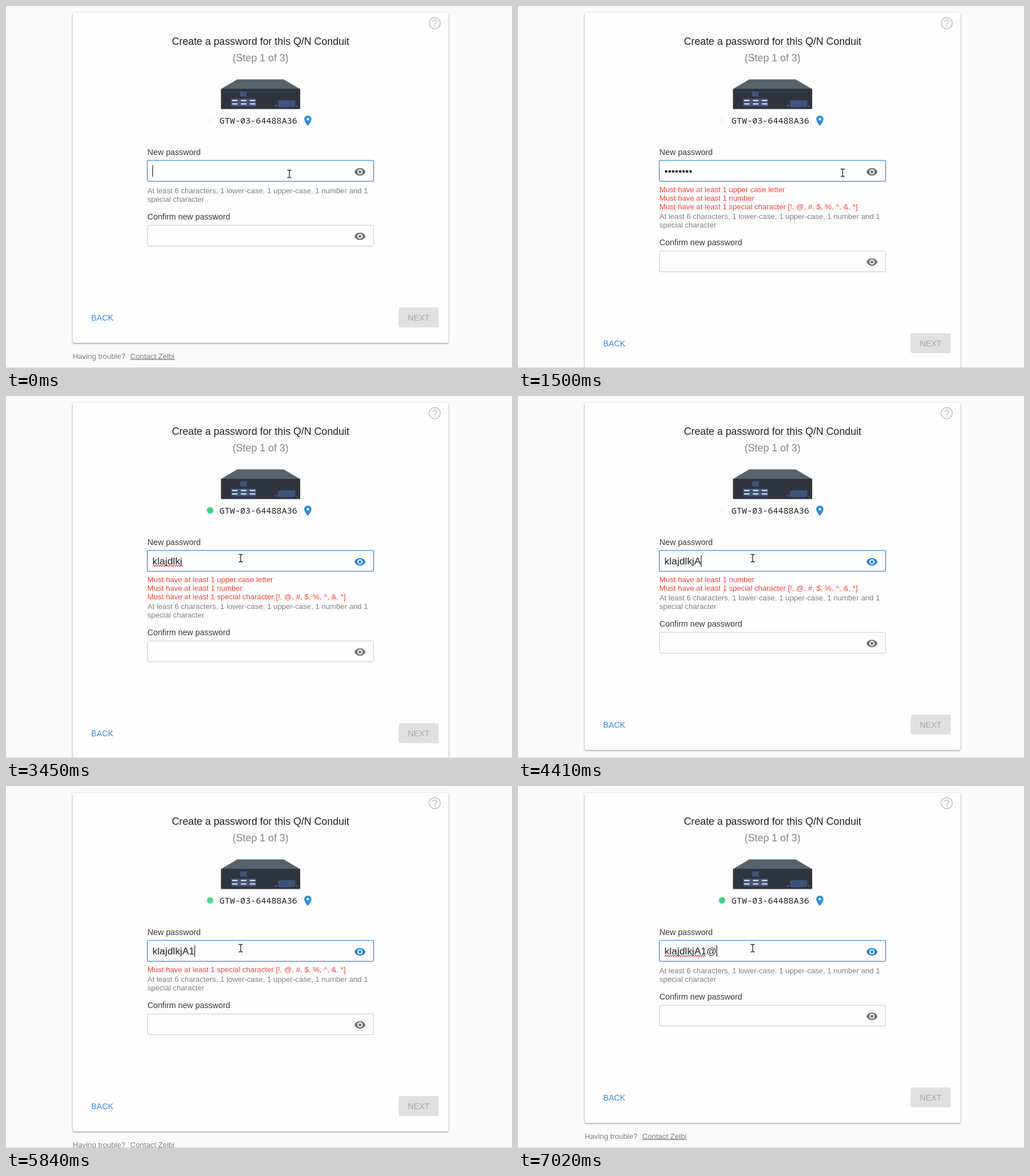
An HTML page that plays this animation: 884x634 px, repeating every 7.1 s.

```html
<!DOCTYPE html>
<html lang="en">
<head>
<meta charset="utf-8">
<title>Create a password</title>
<style>
  html, body { margin: 0; width: 100%; height: 100%; overflow: hidden; background: #fafafa; }
  svg { display: block; font: 14.22px "Liberation Sans", Arial, sans-serif; fill: #3a3a3a; }
  .mid { text-anchor: middle; }
  .big { font-size: 17.78px; }
  .small { font-size: 13.16px; fill: #808080; }
  .error { font-size: 13.16px; fill: #f44336; }
  .box { fill: #fefefe; stroke: #c8c8c8; }
  .focus { stroke: #5b9ce6; stroke-width: 1.6; }
  #card { fill: #fefefe; filter: drop-shadow(0 1px 1px #0004) drop-shadow(0 1px 1.5px #0003); }
  #secret { font-size: 17.4px; fill: #222; }
</style>
</head>
<body>
<svg width="884" height="634" viewBox="0 0 884 634">
  <defs>
    <path id="eye" transform="translate(-10.67 -10.67) scale(.889)" d="M12 4.5C7 4.5 2.73 7.61 1 12c1.73 4.39 6 7.5 11 7.5s9.27-3.11 11-7.5c-1.73-4.39-6-7.5-11-7.5zM12 17c-2.76 0-5-2.24-5-5s2.24-5 5-5 5 2.24 5 5-2.24 5-5 5zm0-8c-1.66 0-3 1.34-3 3s1.34 3 3 3 3-1.34 3-3-1.34-3-3-3z"/>
  </defs>

  <rect id="card" x="116.5" y="11.5" width="656.5" rx="4"/>
  <path fill="#cdcdcd" transform="translate(736.1 17) scale(1.075)" d="M11 18h2v-2h-2v2zm1-16C6.48 2 2 6.48 2 12s4.48 10 10 10 10-4.48 10-10S17.52 2 12 2zm0 18c-4.41 0-8-3.59-8-8s3.59-8 8-8 8 3.59 8 8-3.59 8-8 8zm0-14c-2.21 0-4 1.79-4 4h2c0-1.1.9-2 2-2s2 .9 2 2c0 2-3 1.75-3 5h2c0-2.25 3-2.5 3-5 0-2.21-1.79-4-4-4z"/>
  <text class="mid big" x="444.7" y="68" fill="#222">Create a password for this Q/N Conduit</text>
  <text class="mid big" x="444.7" y="97" fill="#858585">(Step 1 of 3)</text>

  <path fill="#59626a" d="M404 128.5h81l29 17H375.500z"/>
  <rect x="375.500" y="145" width="138.500" height="35.500" rx="1.500" fill="#2f343d"/>
  <g fill="#41527a">
    <rect x="409" y="149.500" width="11.500" height="9"/>
    <rect x="393" y="162" width="44" height="14"/>
    <rect x="475" y="165" width="30.500" height="12" rx="2.500"/>
    <circle cx="471.500" cy="175" r="2"/>
    <circle cx="508.500" cy="175.500" r="1.500"/>
  </g>
  <path stroke="#f2f4f8" stroke-width="2" d="M395 165.500h9.500m6 0h9.500m6 0h9.500M395 171.500h9.500m6 0h9.500m6 0h9.500"/>

  <circle id="dot" cx="356.500" cy="200.200" r="5.700" fill="#38d27f"/>
  <text x="373" y="206" fill="#222" style="font: 15.1px 'Noto Sans Mono', monospace">GTW-03-64488A36</text>
  <path fill="#2f8be0" transform="translate(516.500 190.100) scale(.9)" d="M12 2C8.130 2 5 5.130 5 9c0 5.250 7 13 7 13s7-7.750 7-13c0-3.870-3.130-7-7-7zm0 9.500c-1.380 0-2.500-1.120-2.500-2.500s1.120-2.500 2.500-2.500 2.500 1.120 2.500 2.500-1.120 2.500-2.500 2.500z"/>

  <text x="247" y="261">New password</text>
  <rect id="field" class="box" x="247" y="270.500" width="395.300" height="36.500" rx="1.500"/>
  <text id="secret" x="255.800" y="295"></text>
  <path id="squiggle" fill="none" stroke="#e53935" stroke-width="1.100"/>
  <rect id="caret" y="279" width="1.200" height="20" fill="#222"/>
  <circle id="ripple" cx="618" cy="290" fill="#000"/>
  <use id="reveal" href="#eye" x="618.400" y="290.400"/>

  <g id="errors"></g>
  <g id="below">
    <text class="small" x="247" y="328">At least 6 characters, 1 lower-case, 1 upper-case, 1 number and 1</text>
    <text class="small" x="247" y="342.500">special character</text>
    <text x="247" y="374">Confirm new password</text>
    <rect class="box" x="247.500" y="384" width="394.500" height="36.500" rx="1.500"/>
    <use href="#eye" x="618.400" y="403.300" fill="#757575"/>
    <text x="148.700" y="551" fill="#3b8ddd">BACK</text>
    <rect x="686" y="528" width="70" height="35" rx="3.500" fill="#e0e0e0"/>
    <text class="mid" x="721" y="551" fill="#a6a6a6">NEXT</text>
    <text class="small" x="116.500" y="617.500">Having trouble?</text>
    <text class="small" x="217" y="617.500" text-decoration="underline">Contact Zelbi</text>
  </g>

  <g id="tooltip">
    <rect id="tipBox" y="217" height="34" rx="3" fill="#222"/>
    <path d="M609.500 250.500h18l-9 7z" fill="#222"/>
    <text id="tipText" class="mid" x="618.300" y="239" fill="#fff"></text>
  </g>
  <circle id="press" cx="613" cy="289" r="13" fill="#f4ee1c"/>
  <g id="mouse">
    <path id="beam" fill="none" stroke="#222" stroke-width="1.300" d="M-3.500-6.500h2.300l1.200 1 1.200-1h2.300M0-5.500v11M-3.500 6.500h2.300l1.200-1 1.200 1h2.300"/>
    <path id="hand" fill="#fff" stroke="#111" stroke-width="1.200" stroke-linejoin="round" d="M-1.500 1Q0-1 1.500 1v6q1.500-1.500 3 .5 1.500-1 3 .7 2-.8 2.500 1.300v4l-2 5.500h-8l-5.500-7.500q0-2 2-1.500l2 2zM1.500 7v3M4.500 7.500v3M7.500 8.500v2.500"/>
  </g>
  <rect y="633" width="884" height="1" fill="#d4d4d4"/>
</svg>

<script>
const LOOP = 7100, ROW = 15, BLINK = 530;
const PRESS = 2200, SHOWN = 2440, FOCUS = 3380;
const ui = {};
document.querySelectorAll("[id]").forEach(el => ui[el.id] = el);
const set = (el, attrs) => { for (const k in attrs) el.setAttribute(k, attrs[k]); };
const show = (el, on) => set(el, { opacity: +on });
const ramp = (t, from, to) => Math.max(0, Math.min(1, (t - from) / (to - from)));

const password = "klajdlkjA1@";
const keyTimes = [150, 280, 410, 540, 670, 800, 880, 960, 4400, 5450, 6870];
const blinkStarts = [0, ...keyTimes, 2920].sort((a, b) => a - b);
// Status light: alternating dimmest and brightest moments
const pulse = [0, 375, 750, 1200, 1530, 1800, 2080, 2755, 3135, 3460, 3845, 4110,
  4420, 4875, 5280, 5760, 6100, 6435, 6715, 7060, 7400];
const mousePath = [[0, 495, 294], [1300, 495, 294], [1500, 567, 292],
  [1720, 613, 289], [3210, 613, 289], [3370, 410, 284], [LOOP, 410, 284]];
const rules = [
  [/.{6}/, "Must have at least 6 characters"],
  [/[A-Z]/, "Must have at least 1 upper case letter"],
  [/\d/, "Must have at least 1 number"],
  [/[!@#$%^&*]/, "Must have at least 1 special character [!, @, #, $, %, ^, &, *]"],
];

const errorRows = rules.map((_, i) => {
  const row = document.createElementNS("http://www.w3.org/2000/svg", "text");
  set(row, { class: "error", x: 247, y: 326 + i * ROW });
  return ui.errors.appendChild(row);
});

function brightness(t) {
  const i = pulse.findIndex(p => p > t) - 1;
  const wave = (1 - Math.cos(Math.PI * ramp(t, pulse[i], pulse[i + 1]))) / 2;
  return 0.04 + 0.96 * (i % 2 ? 1 - wave : wave);
}

function mouseAt(t) {
  const i = mousePath.findIndex(p => p[0] > t);
  const [t0, x0, y0] = mousePath[i - 1], [t1, x1, y1] = mousePath[i];
  const k = ramp(t, t0, t1);
  return [x0 + (x1 - x0) * k, y0 + (y1 - y0) * k];
}

function drawField(t, typed) {
  const shown = t >= SHOWN, focused = t < PRESS || t >= FOCUS;
  ui.secret.textContent = shown ? typed : "•".repeat(typed.length);
  set(ui.field, { class: focused ? "box focus" : "box" });
  set(ui.reveal, { fill: shown ? "#2f87dd" : "#757575" });

  const lastBlink = blinkStarts.filter(s => s <= t).pop();
  const lit = Math.floor((t - lastBlink) / BLINK) % 2 === 0;
  const width = typed ? ui.secret.getComputedTextLength() : 0;
  set(ui.caret, { x: 255.6 + width });
  show(ui.caret, focused && lit);

  const waves = t >= 6560 ? 18 : t >= FOCUS && t < keyTimes[8] ? 13 : 0;
  set(ui.squiggle, { d: "M256 298.500" + "l2-2 2 2".repeat(waves) });
}

function drawPointer(t) {
  const [x, y] = mouseAt(t), overEye = x > 600;
  set(ui.mouse, { transform: `translate(${x} ${y})` });
  show(ui.hand, overEye);
  show(ui.beam, !overEye);
  set(ui.press, { opacity: 0.75 * ramp(t, PRESS, 2260) * (1 - ramp(t, 2440, 2540)) });
  set(ui.ripple, {
    r: 8 + 18 * ramp(t, PRESS, 2340),
    opacity: t < PRESS ? 0 : 0.09 * (1 - ramp(t, 2480, 2680)),
  });

  const half = t < SHOWN ? 73 : 70;
  ui.tipText.textContent = t < SHOWN ? "Show password" : "Hide password";
  set(ui.tipBox, { x: 618.2 - half, width: 2 * half });
  set(ui.tooltip, { opacity: ramp(t, 1800, 1950) * (1 - ramp(t, 3270, 3400)) });
}

function draw() {
  const t = performance.now() % LOOP;
  const typed = password.slice(0, keyTimes.filter(k => k <= t).length);
  const errors = typed ? rules.filter(([test]) => !test.test(typed)) : [];
  errorRows.forEach((row, i) => row.textContent = errors[i] ? errors[i][1] : "");
  const shift = errors.length * ROW;
  set(ui.below, { transform: `translate(0 ${shift})` });
  set(ui.card, { height: 578.5 + shift });
  show(ui.dot, 1);
  set(ui.dot, { opacity: brightness(t) });
  drawField(t, typed);
  drawPointer(t);
  requestAnimationFrame(draw);
}
draw();
</script>
</body>
</html>
```
